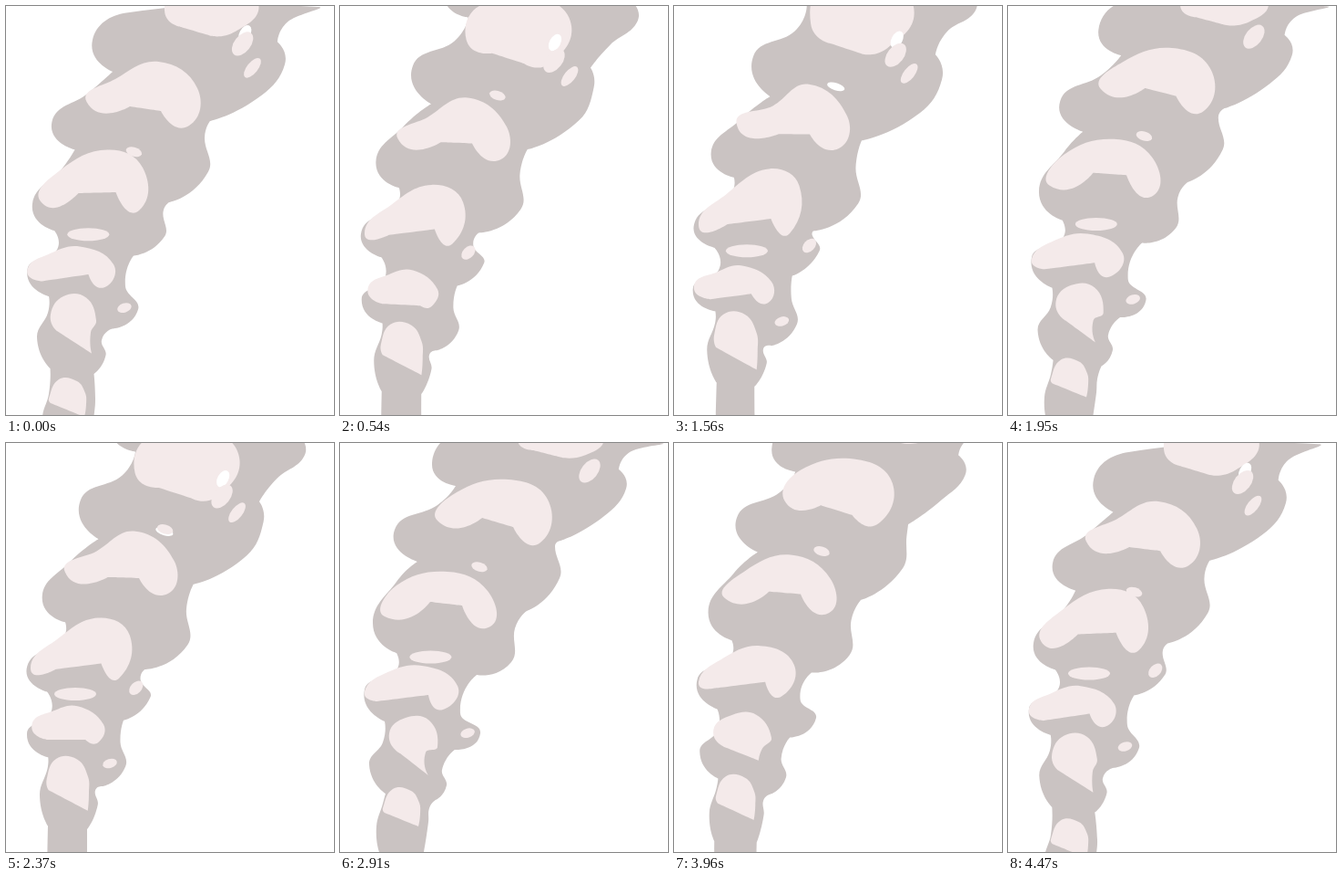
Recreate the animation shown at these times as an HTML page with a canvas. Size 360 by 448 pixels, loop 4500 ms.

```html
<!DOCTYPE html>
<html lang="en">
<head>
<meta charset="utf-8">
<title>Smoke</title>
<style>
html, body { margin: 0; overflow: hidden; background: #fff; }
canvas { display: block; }
</style>
</head>
<body>
<canvas id="stage" width="360" height="448"></canvas>
<script>
const ctx = document.getElementById('stage').getContext('2d');
const CYCLE = 900, MIDDLE = 480, STEP = 30, START = 690;
const GREY = '#cac3c2', PALE = '#f4eaea';

// Splits x, y values into one row of points per puff, from the bottom up.
function puffs(values, size, isSharp) {
  const rows = [];
  for (let i = 0; i < values.length; i += 2) {
    const n = i / 2;
    if (n % size === 0) rows.push([]);
    rows.at(-1).push([values[i], values[i + 1], isSharp(n % size)]);
  }
  return rows;
}
const edge = values => puffs(values, 3, i => i === 0); // valley, bulge, shoulder
const cap = values => puffs(values, 7, i => i > 4);    // five round points, two cusps

const leftStart = edge([
  43, 448, 40, 420, 47, 395,
  50, 384, 32, 352, 47, 328,
  49, 305, 27, 270, 61, 250,
  62, 230, 36, 197, 62, 152,
  85, 130, 60, 95, 107, 68,
  127, 47, 101, 22, 130, -10
]);
const leftMiddle = edge([
  47, 410, 36, 374, 45, 344,
  45, 331, 20, 307, 49, 287,
  44, 262, 22, 236, 62, 203,
  66, 185, 41, 158, 72, 124,
  107, 97, 89, 52, 134, 25
]);
const rightStart = edge([
  92, 448, 97, 415, 98, 400,
  105, 391, 117, 375, 112, 358,
  126, 336, 154, 318, 132, 296,
  150, 254, 188, 240, 192, 203,
  205, 184, 241, 148, 236, 113,
  242, 107, 290, 80, 314, 50,
  306, 29, 318, 10, 352, 0
]);
const rightMiddle = edge([
  88, 415, 102, 390, 98, 374,
  107, 371, 136, 347, 130, 318,
  130, 293, 160, 265, 153, 248,
  153, 246, 203, 215, 200, 175,
  206, 145, 272, 115, 298, 78,
  290, 50, 300, 25, 332, 2
]);
const capsStart = cap([
  47, 400, 58, 379, 78, 381, 87, 394, 88, 406, 86, 420, 49, 405,
  54, 318, 72, 301, 98, 304, 107, 333, 94, 339, 97, 364, 66, 340,
  27, 272, 48, 253, 90, 244, 129, 266, 113, 292, 97, 276, 40, 283,
  49, 190, 62, 156, 118, 141, 162, 162, 165, 201, 134, 178, 99, 174,
  107, 85, 128, 54, 185, 40, 228, 62, 220, 109, 190, 92, 156, 82,
  195, -5, 215, -30, 260, -30, 289, -5, 270, 13, 240, 15, 212, 8
]);
const capsMiddle = cap([
  44, 357, 54, 335, 78, 335, 91, 356, 92, 376, 91, 397, 46, 372,
  20, 305, 45, 291, 72, 283, 107, 300, 104, 324, 84, 312, 38, 320,
  27, 238, 58, 203, 105, 174, 138, 192, 128, 246, 107, 230, 60, 236,
  70, 125, 112, 106, 150, 82, 192, 118, 182, 153, 150, 138, 116, 138,
  153, 15, 165, -25, 240, -30, 266, 5, 235, 42, 208, 50, 172, 38
]);

// from ms, to ms, x and y at both times, radii, angle
const holes = [
  [330, 700, 236, 40, 263, 30, 6, 10, 0.5],
  [340, 620, 173, 99, 185, 72, 10, 4, 0.3]
];
const glints = [
  [360, 960, 76, 275, 102, 230, 23, 7, 0],
  [600, 1300, 135, 170, 177, 90, 9, 5, 0.3],
  [360, 960, 114, 351, 143, 314, 8, 5, -0.3],
  [1200, 1580, 139, 272, 163, 248, 9, 6, -0.8],
  [330, 930, 235, 60, 276, 29, 15, 9, -0.9],
  [330, 720, 252, 77, 272, 67, 13, 6, -0.9]
];

const mix = (a, b, u) => a + (b - a) * u;
const shift = (row, dx, dy) => row.map(([x, y, sharp]) => [x + dx, y + dy, sharp]);

// In the second part of a cycle each puff turns into the one above it.
function rowsAt(start, middle, ms) {
  const rising = ms >= MIDDLE;
  const u = rising ? (ms - MIDDLE) / (CYCLE - MIDDLE) : ms / MIDDLE;
  const above = k => middle[k] || shift(start[k], 20, -50);
  return start.map((row, k) => {
    const from = !rising ? row : k ? above(k - 1) : shift(row, 0, 60);
    const to = rising ? row : above(k);
    return from.map(([x, y, sharp], i) => [mix(x, to[i][0], u), mix(y, to[i][1], u), sharp]);
  });
}

function fillCloud(points, color) {
  const n = points.length, at = i => points[(i + n) % n];
  // Control point beside point i, towards its neighbour in direction dir.
  const control = (i, dir) => {
    const [x, y, sharp] = at(i), near = at(i + dir), far = at(i - dir);
    if (sharp) return [x, y];
    const dx = near[0] - far[0], dy = near[1] - far[1];
    const length = Math.hypot(near[0] - x, near[1] - y) * (near[2] ? 0.6 : 0.38);
    const k = length / (Math.hypot(dx, dy) || 1);
    return [x + dx * k, y + dy * k];
  };
  ctx.beginPath();
  ctx.moveTo(points[0][0], points[0][1]);
  for (let i = 0; i < n; i++) {
    const [x, y] = at(i + 1);
    ctx.bezierCurveTo(...control(i, 1), ...control(i + 1, -1), x, y);
  }
  ctx.fillStyle = color;
  ctx.fill();
}

function fillSpots(spots, ms, color) {
  ctx.fillStyle = color;
  for (const [from, to, x0, y0, x1, y1, rx, ry, angle] of spots)
    for (const age of [ms, ms + CYCLE]) {
      if (age < from || age > to) continue;
      const u = (age - from) / (to - from);
      ctx.beginPath();
      ctx.ellipse(mix(x0, x1, u), mix(y0, y1, u), rx, ry, angle, 0, 2 * Math.PI);
      ctx.fill();
    }
}

function draw(time) {
  const ms = (Math.floor(time / STEP) * STEP + START) % CYCLE;
  const left = rowsAt(leftStart, leftMiddle, ms).flat();
  const right = rowsAt(rightStart, rightMiddle, ms).flat().reverse();
  ctx.clearRect(0, 0, 360, 448);
  fillCloud([[44, 520, true], ...left, ...right, [89, 520, true]], GREY);
  for (const row of rowsAt(capsStart, capsMiddle, ms)) fillCloud(row, PALE);
  fillSpots(holes, ms, '#fff');
  fillSpots(glints, ms, PALE);
}

const begin = performance.now();
function frame() {
  draw(performance.now() - begin);
  requestAnimationFrame(frame);
}
frame();
</script>
</body>
</html>
```
